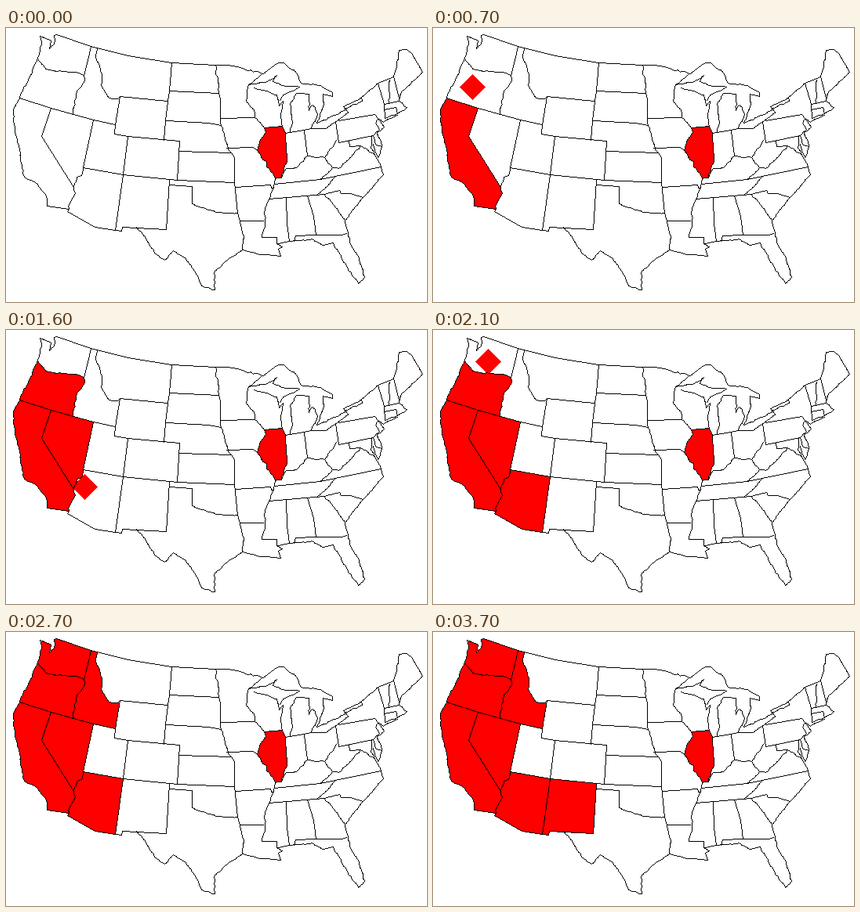
Animation of 537x350 px, one loop 3800 ms. Source, as a matplotlib script:

```python
import numpy as np
import matplotlib.pyplot as plt
from matplotlib.animation import FuncAnimation

W, H, DPI = 537, 350, 100
FRAMES, STEP = 38, 100
RED = (255, 0, 0)

rng = np.random.default_rng(4)
ink = np.zeros((H, W), bool)


def line(*xy):
    """One-pixel polyline through the given x, y pairs."""
    pts = np.reshape(xy, (-1, 2))
    for a, b in zip(pts[:-1], pts[1:]):
        n = int(np.ceil(abs(b - a).max())) + 1
        x, y = np.rint(np.linspace(a, b, n)).astype(int).T
        ink[y, x] = True


def shore(*xy):
    """Coast or river: key points joined by a slightly ragged course."""
    pts = np.reshape(xy, (-1, 2)).astype(float)
    out = [pts[0]]
    for a, b in zip(pts[:-1], pts[1:]):
        n = max(1, int(np.hypot(*(b - a)) / 4))
        for i in range(1, n):
            out.append(a + (b - a) * i / n + rng.uniform(-0.9, 0.9, 2))
        out.append(b)
    line(*np.ravel(out))


# Pacific states
shore(40, 38, 45, 17, 43, 10, 57, 16, 55, 26, 62, 16, 61, 9, 64, 8)
line(64, 8, 108, 23, 155, 35, 211, 44, 267, 47, 284, 47)
line(108, 23, 103, 45, 99, 60)
shore(40, 38, 50, 52, 60, 54, 88, 56, 99, 60)
shore(40, 38, 30, 62, 18, 84, 17, 89)
shore(99, 60, 100, 66, 89, 84, 85, 109)
line(17, 89, 57, 102, 111, 117, 139, 123, 145, 87)
shore(17, 89, 9, 104, 11, 133, 16, 150, 20, 178, 23, 190, 36, 196, 51, 214, 52, 227)
line(52, 227, 80, 231)
shore(80, 231, 79, 227, 88, 211, 86, 203)
line(57, 102, 45, 138, 86, 203)
shore(86, 203, 90, 190, 96, 188, 98, 178)
line(98, 178, 111, 117)

# Mountains and southwest
shore(116, 26, 114, 36, 122, 59, 121, 73, 131, 89, 142, 90, 145, 87)
line(145, 87, 205, 93)
line(139, 123, 138, 135, 155, 138, 221, 144, 218, 194)
line(155, 138, 149, 187, 139, 258)
line(98, 178, 149, 187, 218, 194, 291, 197)
line(208, 194, 204, 257, 148, 254, 147, 259, 139, 258, 113, 254, 78, 234, 80, 231)

# Plains
line(211, 44, 208, 80, 206, 93, 203, 118, 201, 143)
line(208, 80, 271, 83)
line(204, 118, 258, 121, 274, 124)
shore(267, 47, 271, 83, 273, 90)
line(273, 90, 273, 114)
shore(273, 114, 274, 124, 283, 155, 291, 165)
line(291, 165, 291, 197, 295, 236, 298, 246)
line(220, 157, 287, 159)
line(208, 200, 237, 202, 237, 224)
shore(237, 224, 268, 235, 295, 236)
line(273, 115, 317, 114)
line(281, 153, 315, 152, 320, 156)
line(292, 203, 337, 200, 338, 204, 341, 204)
line(298, 246, 328, 246)

# Texas, the Gulf and the Atlantic
shore(298, 246, 303, 266, 301, 283)
shore(166, 254, 178, 268, 189, 287, 202, 296, 213, 284, 228, 293, 242, 313, 249, 329,
      266, 334, 265, 312, 279, 298, 301, 283, 325, 289, 350, 291, 347, 282, 352, 279,
      345, 275, 361, 272, 390, 269, 404, 277, 417, 274, 428, 295, 449, 326, 457, 318,
      450, 295, 438, 273, 432, 245, 455, 216, 481, 187, 478, 177, 465, 153, 466, 138)
line(345, 275, 345, 267, 326, 267)
shore(468, 137, 472, 149, 479, 151, 474, 165, 468, 148)
shore(479, 151, 473, 133, 482, 126, 474, 115, 481, 120, 499, 111)
shore(483, 115, 499, 109, 511, 101, 501, 93, 505, 80, 531, 56, 517, 32, 511, 27,
      501, 28, 497, 52, 494, 62)

# Mississippi and the state that stays red
shore(284, 47, 327, 58, 309, 72, 306, 93, 316, 104, 317, 114, 329, 127)
line(329, 127, 352, 125, 356, 134, 357, 156)
shore(357, 156, 358, 167, 351, 191, 343, 192, 341, 187, 332, 177, 332, 170, 327, 168,
      320, 156, 323, 144, 331, 133, 329, 127)
shore(343, 192, 340, 206, 330, 230, 330, 250, 326, 267)

# Great Lakes
shore(327, 58, 345, 45, 354, 44, 370, 57, 376, 70, 400, 73, 416, 82, 416, 87, 404, 84,
      405, 97, 396, 121, 434, 104, 430, 100, 453, 88, 474, 70)
shore(309, 72, 331, 69, 345, 60, 340, 68, 352, 73, 374, 75, 353, 85, 349, 92)
shore(316, 76, 345, 85, 348, 99, 353, 93, 350, 112, 352, 125)
line(356, 134, 379, 130, 389, 128)
shore(362, 132, 365, 120, 362, 97, 370, 83, 386, 84, 386, 105, 391, 98, 397, 110,
      389, 128, 408, 128, 436, 108, 434, 104)
shore(453, 88, 454, 93, 431, 103)

# Ohio valley and Appalachia
line(380, 131, 384, 163)
shore(351, 191, 357, 179, 370, 178, 384, 163, 406, 165, 421, 143)
line(420, 119, 424, 146, 468, 137)
line(424, 118, 470, 110)
shore(470, 110, 474, 115, 471, 121, 476, 129, 468, 137)
shore(437, 144, 438, 151, 452, 150, 470, 162)
shore(452, 150, 436, 168, 424, 179, 416, 178, 406, 165)
shore(416, 178, 409, 186, 400, 193)
line(342, 199, 400, 193, 478, 177)
shore(420, 189, 410, 201, 397, 212)
line(335, 218, 405, 212, 425, 207, 427, 211, 439, 211, 455, 216)
shore(405, 212, 418, 226, 432, 245)
line(357, 217, 358, 250, 361, 272)
line(384, 214, 392, 240, 395, 264)
line(367, 272, 369, 265, 395, 264, 428, 264, 434, 262)

# New England
line(474, 70, 482, 97, 483, 115)
line(474, 70, 494, 62, 501, 89)
shore(489, 66, 488, 96)
line(482, 97, 501, 93)
line(482, 104, 497, 101, 499, 109)


def distance(x, y):
    """Steps from the seed to each pixel it can reach without crossing ink."""
    dist = np.full((H, W), np.inf)
    reach = np.zeros((H, W), bool)
    reach[y, x] = True
    new, n = reach, 0
    while new.any():
        dist[new] = n
        grown = reach.copy()
        grown[1:] |= reach[:-1]
        grown[:-1] |= reach[1:]
        grown[:, 1:] |= reach[:, :-1]
        grown[:, :-1] |= reach[:, 1:]
        grown &= ~ink
        new, reach, n = grown & ~reach, grown, n + 1
    return dist


class Flood:
    """Red that spreads from a seed, then fills the whole state at the last step."""

    def __init__(self, x, y, speed, start, steps):
        self.dist = distance(x, y)
        self.speed, self.start, self.steps = speed, start, steps

    def mask(self, k):
        age = k - self.start + 1
        if age >= self.steps:
            return np.isfinite(self.dist)
        return self.dist <= self.speed * age if age > 0 else np.zeros_like(ink)


base = np.full((H, W, 3), 255, np.uint8)
base[ink] = 0
base[np.isfinite(distance(342, 160))] = RED

floods = [
    Flood(40, 150, 20, 1, 6),
    Flood(50, 75, 16, 7, 5),
    Flood(80, 150, 24, 12, 4),
    Flood(100, 200, 16, 16, 5),
    Flood(70, 40, 16, 21, 3),
    Flood(100, 75, 16, 24, 4),
    Flood(160, 200, 20, 33, 5),
]

fig = plt.figure(figsize=(W / DPI, H / DPI), dpi=DPI, facecolor="white")
ax = fig.add_axes([0, 0, 1, 1])
ax.axis("off")
picture = ax.imshow(base, interpolation="nearest", aspect="auto")


def update(k):
    img = base.copy()
    for f in floods:
        img[f.mask(k)] = RED
    picture.set_data(img)
    return [picture]


anim = FuncAnimation(fig, update, frames=FRAMES, interval=STEP, repeat=True,
                     repeat_delay=0, blit=False)
plt.show()
```
